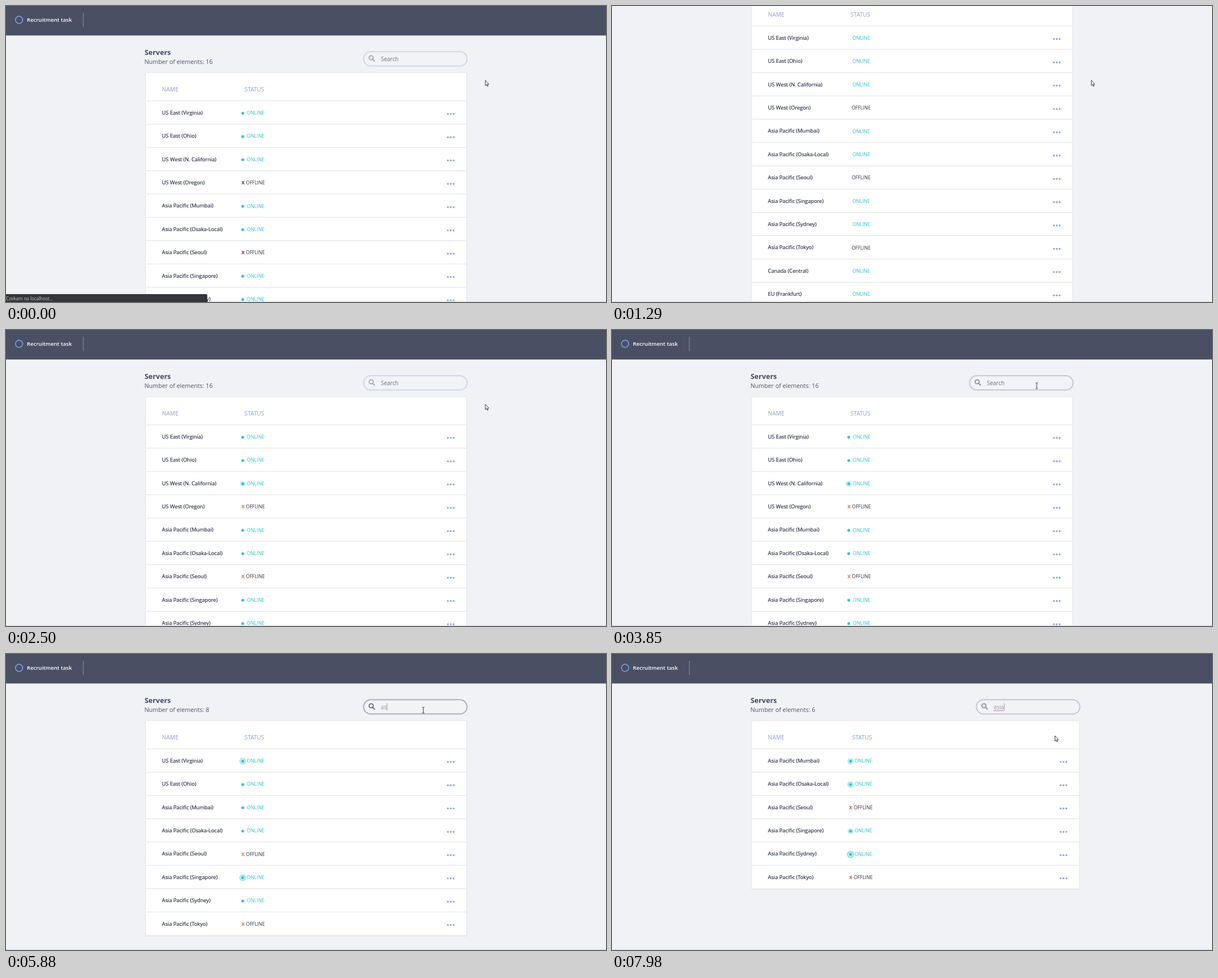
Recreate the animation shown at these times as an HTML page. Size 1064 by 526 pixels, loop 8000 ms.

```html
<!DOCTYPE html>
<html lang="en">
<head>
<meta charset="utf-8">
<title>Servers</title>
<style>
  html, body { margin: 0; width: 100%; height: 100%; overflow: hidden; background: #f1f2f6; }
  svg { display: block; width: 1064px; height: 526px; font-family: "Open Sans", "Noto Sans", sans-serif; }
  text { white-space: pre; }
  .head { font-size: 10.25px; font-weight: 500; fill: #8f9fc9; }
  .name { font-size: 9.26px; fill: #1f2335; stroke: #1f2335; stroke-width: .15px; }
  .state { font-size: 8.55px; }
  .cross { font-size: 9.8px; font-weight: 700; }
</style>
</head>
<body>
<svg viewBox="0 0 1064 526">
  <rect width="1064" height="526" fill="#f1f2f6"/>
  <g id="page">
    <rect width="1064" height="52" fill="#4a4f63"/>
    <rect y="52" width="1064" height="1" fill="#4a4f63" opacity=".4"/>
    <circle cx="23.2" cy="24.6" r="6.4" fill="none" stroke="#739be6" stroke-width="1.7"/>
    <text x="37" y="28" font-size="9.6" font-weight="600" fill="#fff">Recruitment task</text>
    <rect x="136.5" y="12" width="1.3" height="25" fill="#7b8097"/>
    <text x="245.7" y="87.3" font-size="12.6" font-weight="700" fill="#45495c">Servers</text>
    <text id="count" x="245.5" y="103" font-size="10.7" fill="#505362"></text>

    <g id="search">
      <rect id="box" x="634.2" y="81.2" width="183.4" height="25.4" rx="12.7" fill="#f2f3f7" stroke-width="2"/>
      <g id="lens" fill="none" stroke-width="1.9">
        <circle cx="647.6" cy="92" r="3.6"/>
        <path d="M650.3 94.8L653.5 98" stroke-linecap="round"/>
      </g>
      <text id="query" x="664.7" y="97.8" font-size="10"></text>
      <path id="squiggle" fill="none" stroke="#c9587c" stroke-width="1"/>
      <rect id="caret" y="87.5" width=".9" height="13" fill="#8d8f96"/>
    </g>

    <rect id="shade" x="247" y="119" fill="#e4e6eb"/>
    <rect id="card" x="247.5" y="118.5" fill="#fff" stroke="#e9ebef" stroke-width="1.6"/>
    <text class="head" x="276.5" y="151.7">NAME</text>
    <text class="head" id="status" x="422.8" y="151.7">STATUS</text>
    <g id="rows"></g>
  </g>
  <rect y="525" width="1064" height="1" fill="#cfd1d6"/>
  <g id="loading">
    <path d="M0 512H354.5Q357 512 357 514.5V526H0Z" fill="#35363a"/>
    <text y="522.6" font-size="8.05" fill="#c4c6ca">Czekam na localhost...</text>
  </g>
  <path id="arrow" d="M0 0V9.4L2.1 7.5L3.6 10.8L5 10.1L3.6 7H6.3Z" fill="#fff" stroke="#22232b" stroke-width=".9" stroke-linejoin="round"/>
  <path id="beam" d="M-2 -5H-.6L0 -4.5L.6 -5H2M0 -4.5V4.5M-2 5H-.6L0 4.5L.6 5H2" fill="none" stroke="#33343c" stroke-width="1"/>
</svg>
<script>
const LOOP = 8000, TOP = 168.7, PITCH = 41.4;
const NAMES = ["US East (Virginia)", "US East (Ohio)", "US West (N. California)", "US West (Oregon)",
  "Asia Pacific (Mumbai)", "Asia Pacific (Osaka-Local)", "Asia Pacific (Seoul)", "Asia Pacific (Singapore)",
  "Asia Pacific (Sydney)", "Asia Pacific (Tokyo)", "Canada (Central)", "EU (Frankfurt)", "EU (Ireland)",
  "EU (London)", "EU (Paris)", "South America (Sao Paulo)"];
const OFFLINE = /Oregon|Seoul|Tokyo|Paris/;

// Spans in which the picture moves; it rests in between.
const SPANS = [[0, 0], [690, 1070], [1290, 1290], [1530, 2240], [2420, 2670], [2820, 3420], [3620, 4090],
  [4340, 5100], [5320, 5390], [5750, 6040], [6180, 6650], [6830, 7130], [7290, 7360], [7510, 7980]];
const SCROLL = [[690, 0], [1070, 1], [1290, 133], [1530, 145], [1700, 266], [1900, 275], [2080, 340],
  [2240, 340], [2420, 60], [2500, 0]];
const MOUSE_X = [[2820, 850], [3420, 766], [4090, 746], [4340, 746], [4700, 740], [7510, 740], [7980, 785.5]];
const MOUSE_Y = [[2820, 132], [3420, 108], [4090, 94], [4340, 94], [4700, 99.8], [7510, 99.8], [7980, 145.3]];
const HOVER = [[3620, 0], [4200, 1], [7560, 1], [8000, .35]];
const TYPED = [[0, ""], [4820, ""], [5320, "a"], [5750, "as"], [6180, "asi"], [6830, "asia"]];
const CROSS = [[0, "#7c4852"], [1530, "#de4260"], [2420, "#e07c68"], [6180, "#e2625f"]];
// start, end and a moment of full glow
const PULSE = { California: [2420, 4090, 2710], Virginia: [4340, 6180, 5100], Singapore: [4700, 8000, 6441],
  Mumbai: [6040, 8000, 6485], Osaka: [6040, 8000, 6510], Sydney: [6830, 8000, 7980] };

const $ = id => document.getElementById(id);
const set = (el, attrs) => { for (const k in attrs) el.setAttribute(k, attrs[k]); return el; };
const show = (el, on) => el.style.display = on ? "" : "none";
const label = (el, text) => { if (el.textContent !== text) el.textContent = text; };
function add(parent, tag, attrs, text = "") {
  const el = set(document.createElementNS("http://www.w3.org/2000/svg", tag), attrs);
  el.textContent = text;
  return parent.appendChild(el);
}
const latest = (table, t) => table.reduce((a, b) => b[0] <= t ? b : a);
function track(keys, t) {
  if (t <= keys[0][0]) return keys[0][1];
  for (let i = 1; i < keys.length; i++) {
    const [t0, a] = keys[i - 1], [t1, b] = keys[i];
    if (t < t1) return a + (b - a) * (t - t0) / (t1 - t0);
  }
  return keys[keys.length - 1][1];
}
const mix = (a, b, k) => `rgb(${a.map((v, i) => Math.round(v + (b[i] - v) * k))})`;

const rows = NAMES.map(name => {
  const g = add($("rows"), "g", {}), off = OFFLINE.test(name);
  add(g, "text", { class: "name", x: 276.6, y: 24 }, name);
  const state = add(g, "g", {}), icon = add(state, "g", {});
  let ring, cross;
  if (off) cross = add(icon, "text", { class: "cross", x: 417.4, y: 24.4 }, "x");
  else {
    ring = add(icon, "circle", { cx: 419.8, cy: 21.8, fill: "#c3eff1", stroke: "#86dfe2" });
    add(icon, "circle", { cx: 419.8, cy: 21.8, r: 2.5, fill: "#2fc3cd" });
  }
  const word = add(state, "text", { class: "state", x: off ? 425.5 : 427, y: 24.4, fill: off ? "#30323f" : "#2cbfcc" },
    off ? "OFFLINE" : "ONLINE");
  const more = add(g, "g", { fill: "#9aa8cf" });
  for (let i = 0; i < 3; i++) add(more, "circle", { cx: 783.6 + i * 5.1, cy: 23.1, r: 1.75 });
  const line = add(g, "rect", { x: 248, y: -.9, height: 1.6, fill: "#e8eaee" });
  const pulse = PULSE[Object.keys(PULSE).find(k => name.includes(k))];
  return { name, g, state, icon, ring, cross, word, more, line, pulse };
});

function drawRows(list, t, wide) {
  const icons = t < 1290 || t >= 1530;
  rows.forEach(r => {
    const i = list.indexOf(r);
    show(r.g, i >= 0);
    if (i < 0) return;
    set(r.g, { transform: `translate(0 ${TOP + i * PITCH})` });
    set(r.state, { transform: `translate(${wide ? 3.2 : 0} 0)` });
    set(r.more, { transform: `translate(${wide ? 12 : 0} 0)` });
    set(r.line, { width: wide ? 581 : 569 });
    set(r.word, { transform: `translate(${icons ? 0 : -.6} 0)` });
    show(r.icon, icons);
    if (r.cross) return set(r.cross, { fill: latest(CROSS, t)[1] });
    const p = r.pulse, on = p && t >= p[0] && t < p[1];
    show(r.ring, on);
    if (!on) return;
    const glow = .5 + .5 * Math.cos((t - p[2]) / 665 * 2 * Math.PI);
    set(r.ring, { r: 4 + 1.6 * glow, "stroke-width": .7 + .9 * glow, opacity: .65 + .35 * glow });
  });
}

function drawSearch(query, since, t, wide) {
  const hover = track(HOVER, t), focused = t >= 4820;
  const text = $("query");
  set($("search"), { transform: `translate(${wide ? 12 : 0} 0)` });
  set($("box"), { stroke: mix([210, 215, 225], [173, 174, 181], hover) });
  set($("lens"), { stroke: mix([163, 167, 174], [108, 109, 115], hover) });
  label(text, focused ? query : "Search");
  set(text, { fill: focused ? "#96979e" : "#6e7179" });
  const width = query ? text.getComputedTextLength() : 0;
  set($("caret"), { x: 664.9 + width });
  show($("caret"), focused && Math.floor((t - since) / 500) % 2 === 0);
  let d = "M664.7 100";
  for (let x = 1.5, i = 0; x <= width; x += 1.5, i++) d += `L${664.7 + x} ${i % 2 ? 100 : 101.3}`;
  set($("squiggle"), { d });
  show($("squiggle"), query === "asia" && t >= 7130);
}

function drawMouse(t) {
  const x = track(MOUSE_X, t), y = track(MOUSE_Y, t), inside = y < 107 && x < 818;
  show($("arrow"), !inside);
  show($("beam"), inside);
  set($(inside ? "beam" : "arrow"), { transform: `translate(${x} ${y})` });
}

function draw(now) {
  const span = latest(SPANS, now), t = Math.min(now, span[1]);
  const [since, query] = latest(TYPED, t);
  const list = rows.filter(r => r.name.toLowerCase().includes(query));
  const wide = list.length < 7, width = wide ? 581.5 : 569.5, height = TOP + list.length * PITCH - 118.5;
  set($("page"), { transform: `translate(0 ${-track(SCROLL, t)})` });
  set($("card"), { width, height });
  set($("shade"), { width: width + 1, height: height + 1.5 });
  set($("status"), { x: wide ? 426 : 422.8 });
  label($("count"), "Number of elements: " + list.length);
  drawRows(list, t, wide);
  drawSearch(query, since, t, wide);
  drawMouse(t);
  show($("loading"), t < 690);
}

const start = performance.now();
function tick() {
  draw((performance.now() - start) % LOOP);
  requestAnimationFrame(tick);
}
tick();
</script>
</body>
</html>
```
